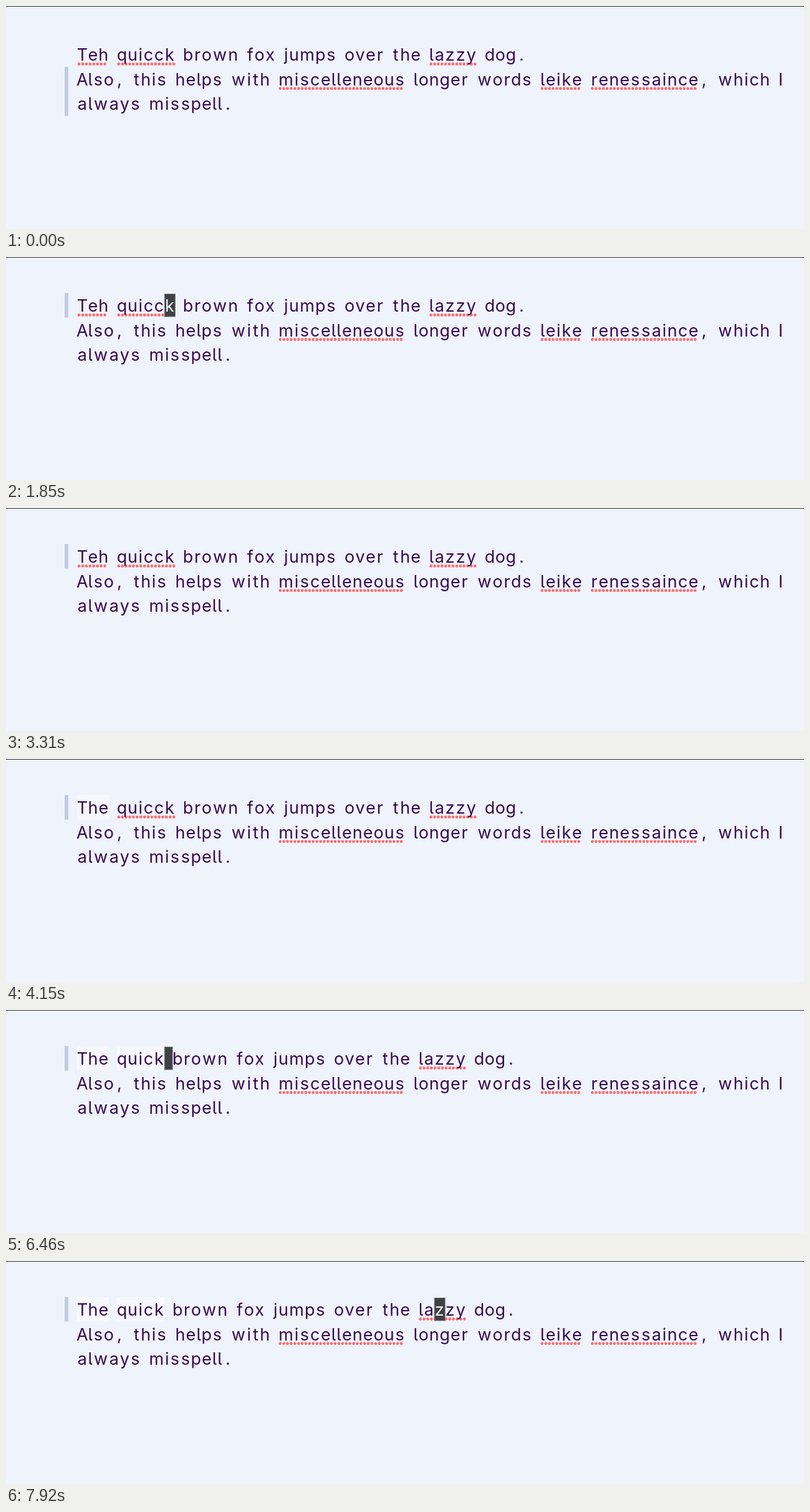
Write an HTML page that moves like this. It is 1280 px wide and 359 px high and loops after 8000 ms.

```html
<!DOCTYPE html>
<html lang="en">
<head>
<meta charset="utf-8">
<title>Spell checking</title>
<style>
  html, body { margin: 0; width: 100%; height: 100%; overflow: hidden; background: #eff3fc; }
  svg { display: block; width: 1280px; height: 359px; }
  text {
    font: 370 27px Inter, "Open Sans", sans-serif;
    font-feature-settings: "cv05";
    text-anchor: middle;
    fill: #36094f;
  }
  .rule { fill: #2b2633; }
  .bar { fill: #c2cbe0; }
  .mark { fill: #f6f8fd; }
  .dot { fill: none; stroke: #fb6c6c; stroke-width: 4.8; stroke-linecap: round; }
  .cursor { fill: #404143; stroke: #77797d; stroke-width: 1; }
  .under { fill: #eff3fc; }
</style>
</head>
<body>
<svg id="stage" viewBox="0 0 1280 359"></svg>
<script>
const LOOP = 8000, LEFT = 113.9, TOP = 58, ROW = 39.4, UNIT = 16.975;
const DOT_STEP = 5.89, REPEAT = 32;
const TAIL = ["Also, this helps with miscelleneous longer words leike renessaince, which I",
              "always misspell."];
const stage = document.getElementById("stage");

// Four advance widths, like a typewriter face with narrow and wide keys.
const advance = c => UNIT * ("mw".includes(c) ? 1.5 : "ijlI".includes(c) ? 0.5 : " frt".includes(c) ? 0.75 : 1);

function cells(line) {
  let x = LEFT;
  return [...line].map(char => {
    const cell = { char, x, w: advance(char) };
    x += cell.w;
    return cell;
  });
}

const rect = (cls, x, y, w, h) => `<rect class="${cls}" x="${x}" y="${y}" width="${w}" height="${h}"/>`;

function glyphs(list, row, cls = "") {
  const shown = list.filter(c => c.char !== " ");
  const xs = shown.map(c => c.x + c.w / 2).join(" ");
  return `<text class="${cls}" y="${TOP + row * ROW + 30.3}" x="${xs}">${shown.map(c => c.char).join("")}</text>`;
}

function span(line, word) {
  const at = line.indexOf(word);
  if (at < 0) return null;
  const part = cells(line).slice(at, at + word.length);
  return { x: part[0].x, w: part.reduce((sum, c) => sum + c.w, 0) };
}

function underline(line, row, word) {
  const s = span(line, word);
  if (!s) return "";
  const count = Math.floor(s.w / DOT_STEP + 0.2);
  const y = TOP + row * ROW + 35.4, x = s.x + 3.3;
  return `<path class="dot" stroke-dasharray="0 ${DOT_STEP}" d="M${x} ${y}h${(count - 1) * DOT_STEP + 0.1}"/>`;
}

function highlight(line, word) {
  const s = span(line, word);
  return s ? rect("mark", s.x, TOP, s.w, ROW) : "";
}

// Cursor as [row, column], or null while it is hidden.
function cursorAt(t) {
  const repeat = start => Math.floor((t - start) / REPEAT);
  if (t < 310) return null;
  if (t < 810) return [2, 15];
  if (t < 1075) return null;
  if (t < 1150) return [1, 16];
  if (t < 1460) return [0, 15];
  if (t < 1690) return [0, 14];
  if (t < 2380) return [0, Math.max(2, 13 - Math.max(0, repeat(1700)))];
  if (t < 2540) return [0, 1];
  if (t < 3080) return [0, 0];
  if (t < 3620) return null;
  if (t < 3920) return [0, 3];
  if (t < 4460) return null;
  if (t < 4850) return [0, 3];
  if (t < 5000) return [0, 4];
  if (t < 5150) return [0, 5];
  if (t < 5460) return [0, 6];
  if (t < 5770) return null;
  if (t < 5960) return [0, 9];
  if (t < 6460) return null;
  if (t < 6850) return [0, 9];
  if (t < 7080) return [0, 10];
  return [0, Math.min(37, 11 + repeat(7080))];
}

function draw(t) {
  const first = (t < 3620 ? "Teh " : "The ") + (t < 5770 ? "quicck" : "quick") + " brown fox jumps over the lazzy dog.";
  const lines = [first, ...TAIL];
  const typos = [["Teh", "quicck", "lazzy"], ["miscelleneous", "leike", "renessaince"], []];
  const cursor = cursorAt(t);

  let out = rect("rule", 0, 0, 1280, 1);
  out += t < 1150 ? rect("bar", 94, 98, 6, 79) : rect("bar", 94, TOP, 6, 39.5);
  if (t >= 3390) out += highlight(first, first.slice(0, 3));
  if (t >= 5460) out += highlight(first, first.split(" ")[1]);
  lines.forEach((line, row) => {
    out += typos[row].map(word => underline(line, row, word)).join("");
    out += glyphs(cells(line), row);
  });
  if (cursor) {
    const [row, col] = cursor;
    const cell = cells(lines[row])[col];
    out += rect("cursor", cell.x + 0.4, TOP + row * ROW + 1.5, cell.w, 36.5);
    out += glyphs([cell], row, "under");
  }
  return out;
}

let last = "";
function tick() {
  const picture = draw(performance.now() % LOOP);
  if (picture !== last) stage.innerHTML = last = picture;
  requestAnimationFrame(tick);
}
tick();
</script>
</body>
</html>
```
